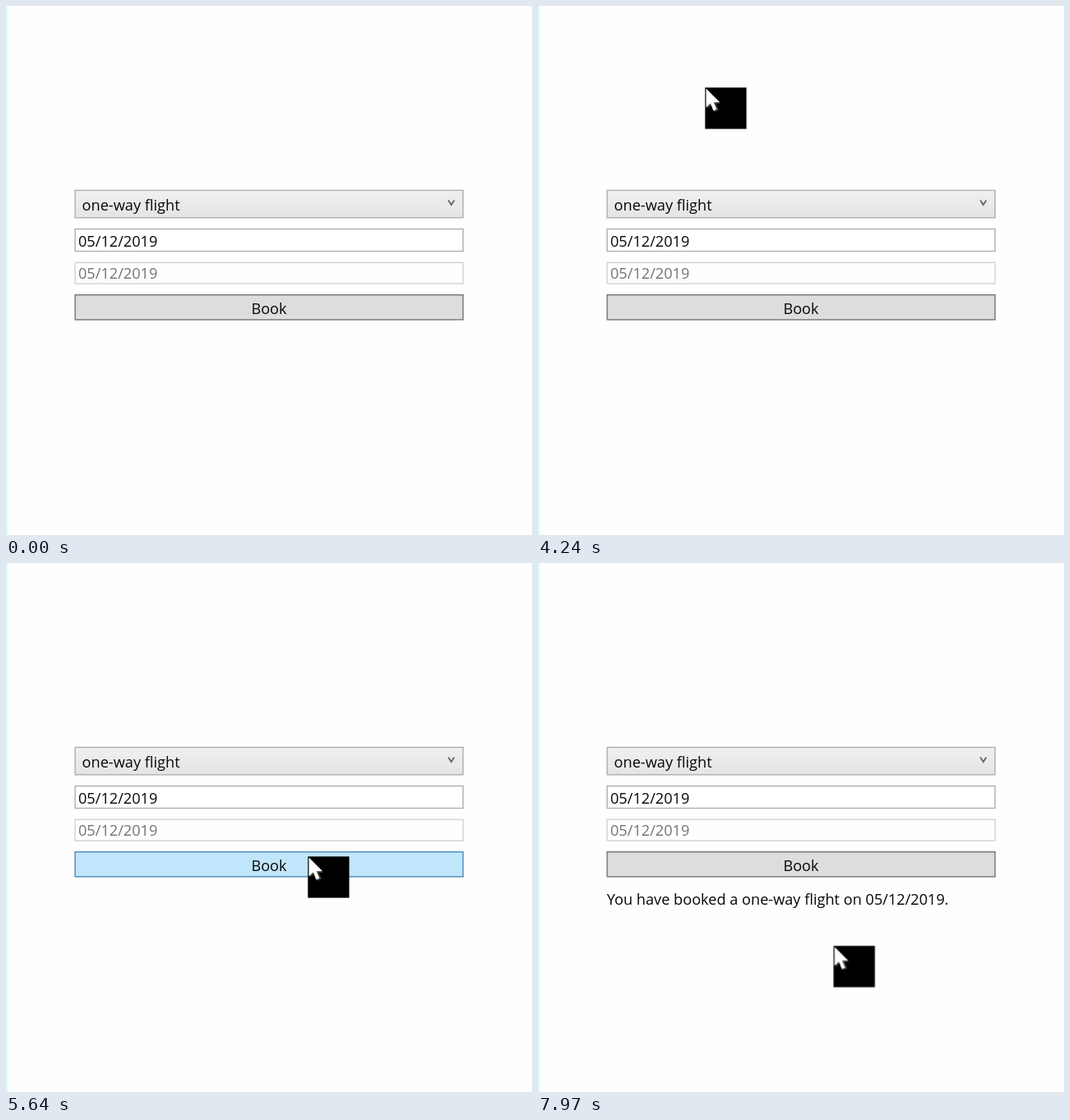
An HTML page for the animation above (8 s loop, 640 by 644 pixels).

```html
<!DOCTYPE html>
<html lang="en">
<head>
<meta charset="utf-8">
<title>Flight booker</title>
<style>
  html, body { margin: 0; width: 100%; height: 100%; overflow: hidden; background: #fefefe; }
  svg { display: block; width: 100%; height: 100%; }
  text { font: 18.15px "Open Sans", "Noto Sans", sans-serif; fill: #080808; }
  .box { x: 84.1px; width: 472px; stroke-width: 1.35; }
  .off { opacity: .56; }
</style>
</head>
<body>
<svg viewBox="0 0 640 644">
  <defs>
    <linearGradient id="combo" x2="0" y2="1">
      <stop stop-color="#f0f0f0"/>
      <stop offset="1" stop-color="#e4e4e4"/>
    </linearGradient>
  </defs>
  <rect width="640" height="644" fill="#fefefe"/>
  <rect width="2" height="644" fill="#d9fbff"/>

  <rect class="box" y="224.4" height="33.4" fill="url(#combo)" stroke="#acacac"/>
  <text x="92.6" y="248.7">one-way flight</text>
  <path d="M538.2 236.5L541.8 242L545.4 236.5" fill="none" stroke="#666" stroke-width="1.9"/>

  <rect class="box" y="271.5" height="27" fill="#fff" stroke="#a9abb0"/>
  <text x="88" y="292.6">05/12/2019</text>

  <g class="off">
    <rect class="box" y="312.4" height="25.6" fill="#fff" stroke="#abadb3"/>
    <text x="88" y="332.2">05/12/2019</text>
  </g>

  <rect id="button" class="box" y="351.7" height="30.2" fill="#ddd" stroke="#707070"/>
  <text x="320" y="374.7" text-anchor="middle">Book</text>
  <text id="message" x="83.8" y="415.8" visibility="hidden">You have booked a one-way flight on 05/12/2019.</text>

  <g id="pointer" transform="translate(-60 102)">
    <rect x=".3" y=".3" width="50.3" height="50.3" fill="#000"/>
    <path d="M3 4V26L8 21L11.5 30L17 27.5L13.5 20L19 19.5Z" fill="#444"/>
    <path d="M1.5 1.5V24.5L6.8 19.6L10.4 28.4L14.4 26.7L10.8 18.3L18 17.9Z" fill="#fff"/>
  </g>
</svg>
<script>
  const LOOP = 8000;

  // steps: [time in ms, style, easing towards the next step]; by default a step is held
  function play(id, steps) {
    const frames = steps.map(([t, style, easing = "step-end"]) => ({ ...style, easing, offset: t / LOOP }));
    frames.push({ ...steps.at(-1)[1], offset: 1 });
    document.getElementById(id).animate(frames, { duration: LOOP, iterations: Infinity });
  }

  const at = (x, y) => ({ transform: `translate(${x}px, ${y}px)` });
  const away = at(-60, 102);
  play("pointer", [
    [0, away],
    [3940, at(21, 102), "ease-out"],
    [4240, at(203, 99)],
    [4370, at(290, 310)],
    [4400, at(408, 579)],
    [4570, at(400, 583), "ease-in"],
    [4700, away],
    [4900, at(338, 640), "linear"],
    [5140, at(345, 466), "ease-out"],
    [5640, at(367, 357)],
    [6510, at(367, 364), "linear"],
    [6570, at(367, 398), "ease-out"],
    [6970, at(364, 469)],
    [7610, at(359.3, 465.8)]
  ].map((step, i, all) => step[0] === 4700 ? step : step));

  const idle = { fill: "#dddddd", stroke: "#707070" };
  const hover = { fill: "#c0e6fb", stroke: "#4a86b5" };
  const pressed = { fill: "#c4e5f6", stroke: "#2c628b" };
  play("button", [[0, idle], [5400, hover], [5810, pressed], [5940, hover], [6610, idle]]);
  play("message", [[0, { visibility: "hidden" }], [5940, { visibility: "visible" }]]);
</script>
</body>
</html>
```
